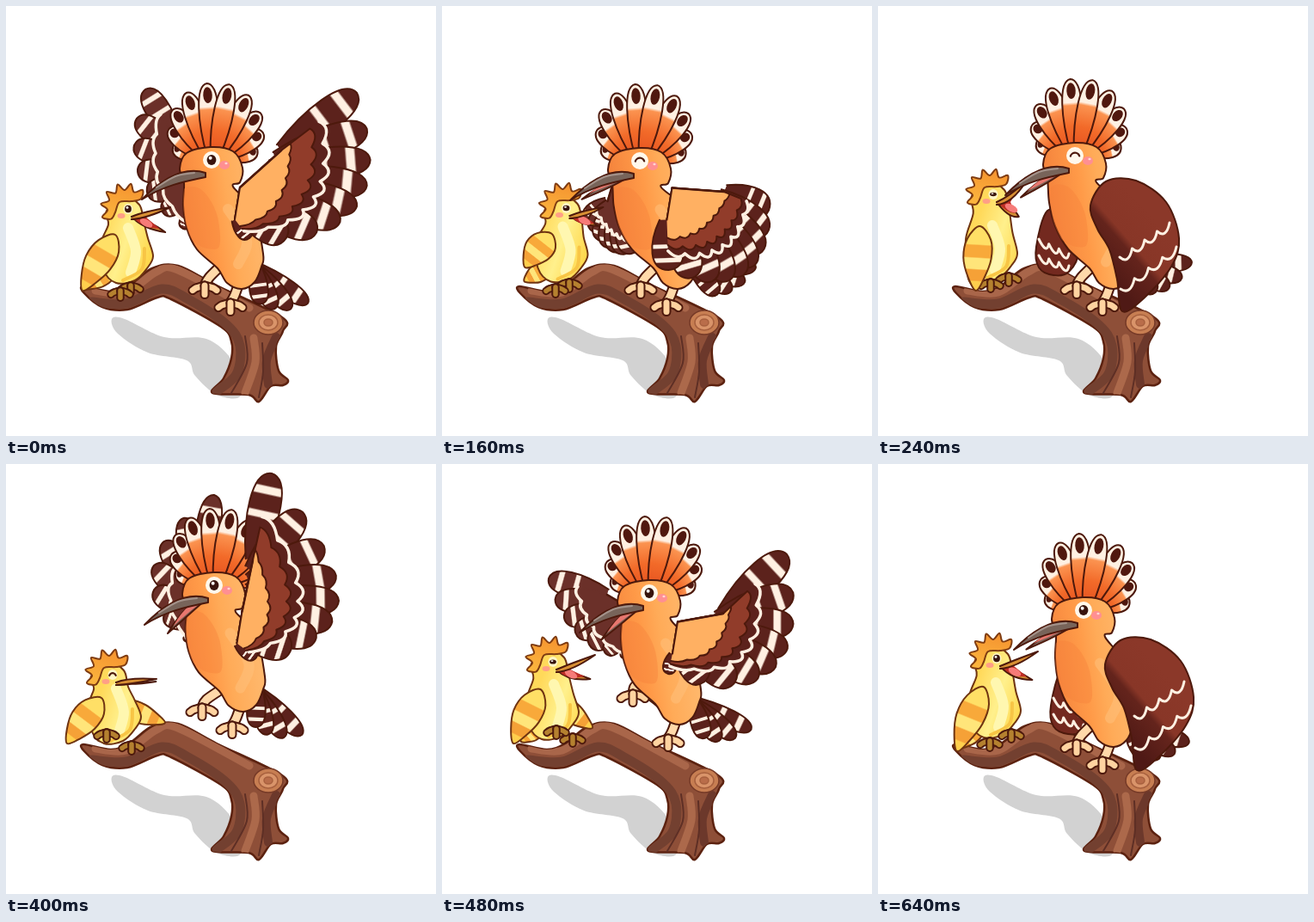
Recreate the animation shown at these times as an HTML page with a canvas. Size 500 px wide and 500 px high, loop 720 ms.

```html
<!DOCTYPE html>
<html>
<head>
<meta charset="utf-8">
<style>
html, body { margin: 0; width: 100%; height: 100%; overflow: hidden; background: #fff; }
canvas { display: block; width: 100vw; height: 100vh; }
</style>
</head>
<body>
<canvas id="stage" width="500" height="500"></canvas>
<script>
const c = document.getElementById('stage').getContext('2d');
const INK = '#4d190c', CREAM = '#fff0e2', GOLD = '#6f3411';
c.lineJoin = c.lineCap = 'round';

// ---- geometry helpers ----
const pairs = a => a.reduce((r, v, i) => (i % 2 ? r[r.length - 1].push(v) : r.push([v]), r), []);
const lerp = (a, b, t) => [a[0] + (b[0] - a[0]) * t, a[1] + (b[1] - a[1]) * t];
const add = (a, b) => [a[0] + b[0], a[1] + b[1]];
const polar = (a, r) => [r * Math.cos(a), r * Math.sin(a)];
const mix = (a, b) => typeof a === 'number' ? (a + b) / 2 : a.map((v, i) => mix(v, b[i]));
// Point on the parabola through three points
const through = ([a, b, d], t) => [0, 1].map(k =>
  a[k] * (1 - t) * (1 - 2 * t) + b[k] * 4 * t * (1 - t) + d[k] * t * (2 * t - 1));

function trace(p, closed = true) {
  const n = p.length, at = i => closed ? p[(i + n) % n] : p[Math.max(0, Math.min(n - 1, i))];
  c.beginPath();
  c.moveTo(...p[0]);
  for (let i = 0; i < n - !closed; i++) {
    const [a, b, d, e] = [at(i - 1), at(i), at(i + 1), at(i + 2)];
    c.bezierCurveTo(b[0] + (d[0] - a[0]) / 6, b[1] + (d[1] - a[1]) / 6,
      d[0] - (e[0] - b[0]) / 6, d[1] - (e[1] - b[1]) / 6, ...d);
  }
}
function paint(fill, stroke = INK, width = 2) {
  if (fill) { c.fillStyle = fill; c.fill(); }
  if (stroke) { c.strokeStyle = stroke; c.lineWidth = width; c.stroke(); }
}
function shape(a, fill, stroke, width) { trace(pairs(a)); paint(fill, stroke, width); }
function line(a, stroke, width) { trace(pairs(a), false); paint(null, stroke, width); }
function tube(a, width, fill) { line(a, INK, width + 4); line(a, fill, width); }
function oval(x, y, rx, ry, fill, stroke = null, turn = 0) {
  c.beginPath();
  c.ellipse(x, y, rx, ry, turn, 0, 7);
  paint(fill, stroke, 1.5);
}
function group([x, y], draw) { c.save(); c.translate(x, y); draw(); c.restore(); }
function inside(draw) { c.save(); c.clip(); draw(); c.restore(); }
function ramp(a, b, stops) {
  const g = c.createLinearGradient(...a, ...b);
  stops.forEach(([t, col]) => g.addColorStop(t, col));
  return g;
}
// Bands of flat colour with a slightly soft seam
const bands = list => list.flatMap(([t, col], i) => [[t, col], [(list[i + 1] || [1.02])[0] - .02, col]]);
const plume = tone => bands([[0, tone], [.5, CREAM], [.58, tone], [.77, CREAM], [.86, tone]]);
const CREST = [[0, '#e4501f'], [.35, '#f26a29'], [.64, '#fb9350'], [.68, CREAM], [1, CREAM]];
const DOWN = bands([[0, '#ffdf66'], [.3, '#f8a93a'], [.5, '#ffe57a'], [.68, '#f5a137'], [.86, '#ffcf4d']]);
// Points tied to a head (weight 1) or a body (weight 0)
const rig = (list, head, body) => list.map(([x, y, w]) => add([x, y], lerp(body, head, w)));

// ---- feathers and wings ----
function feather(b, t, width, stops, spot) {
  const len = Math.hypot(t[0] - b[0], t[1] - b[1]), w = Math.min(width, len * .6);
  group(b, () => {
    c.rotate(Math.atan2(t[1] - b[1], t[0] - b[0]));
    c.beginPath();
    c.moveTo(0, -w * .25);
    c.bezierCurveTo(len * .45, -w * .65, len * .98, -w * .7, len, 0);
    c.bezierCurveTo(len * .98, w * .7, len * .45, w * .65, 0, w * .25);
    paint(ramp([0, 0], [len, 0], stops));
    if (spot) oval(len * .84, 0, len * .11, w * .25, '#50180f');
  });
}

// The tips lie on a parabola from the leading to the innermost feather
function wing(inner, upper, [wrist, ...keys], n, width, tone, coverts) {
  const tip = i => through(keys, i / n), base = i => lerp(wrist, inner, i / n);
  const rim = (from, to) => {
    const at = (i, k = 1) => lerp(base(i), tip(i), (from + (to - from) * i / n) * k);
    c.lineTo(...at(0));
    for (let i = 1; i <= n; i++) c.quadraticCurveTo(...at(i - .5, 1.25), ...at(i));
  };
  const layer = (from, to, fill, edge) => {
    c.beginPath();
    c.moveTo(...inner);
    c.lineTo(...upper);
    c.lineTo(...wrist);
    rim(from, to);
    paint(fill, fill === tone ? tone : INK);
    if (edge) { c.beginPath(); rim(from, to); paint(null, edge, 3.5); }
  };
  for (let i = 0; i <= n; i++) feather(base(i), tip(i), width, plume(tone));
  layer(.5, .62, tone, CREAM);
  coverts.forEach(([from, to, fill]) => layer(from, to, fill));
  c.beginPath();
  c.moveTo(...upper);
  c.lineTo(...wrist);
  paint(null, INK, 2.5);
}

function scallops(a, b, n) {
  c.beginPath();
  c.moveTo(...a);
  for (let i = 1; i <= n; i++) c.quadraticCurveTo(...add(lerp(a, b, (i - .4) / n), [2, 15]), ...lerp(a, b, i / n));
  paint(null, CREAM, 3);
}
function foldedFar() {
  shape([197,238, 184,280, 187,304, 204,313, 222,309, 233,285, 222,245], '#73291f');
  scallops([187, 271], [222, 288], 3);
  scallops([187, 290], [222, 302], 3);
}
function foldedNear() {
  shape([247,232, 265,204, 300,203, 335,228, 350,270, 341,303, 310,339, 284,355, 278,318, 269,283, 255,259],
    ramp([255, 300], [318, 245], [[0, '#4f1915'], [.45, '#64241c'], [.55, '#883627'], [1, '#8b3829']]));
  scallops([281, 292], [339, 252], 4);
  scallops([282, 329], [347, 280], 4);
}

// ---- scenery ----
function scenery() {
  shape([123,364, 138,364, 184,385, 233,387, 264,414, 273,453, 245,452, 220,430, 210,412, 165,403, 130,381], '#d2d2d2', null);
  shape([90,326, 122,332, 143,325, 170,305, 200,302, 245,325, 321,362, 322,378, 314,396, 317,424, 328,435,
    322,441, 308,442, 294,460, 282,452, 240,450, 253,433, 262,410, 262,390, 250,373, 192,341, 176,339,
    141,353, 112,350, 91,334], '#8e4f38', '#5c2210', 2.5);
  inside(() => {
    line([100,344, 140,346, 181,329, 212,341, 256,370, 272,395, 268,428, 245,448], '#734030', 11);
    line([104,331, 140,333, 175,309, 200,307, 283,351], '#a9664a', 9);
    line([288,386, 290,414, 278,450], '#ac694b', 9);
    line([314,385, 303,412, 305,440], '#6c382b', 10);
    line([278,384, 280,415, 262,450], '#5e2f25', 2);
    line([298,392, 299,425, 294,455], '#5e2f25', 2);
  });
  oval(305, 368, 17, 14, '#c77e52', '#763a27');
  oval(305, 368, 11, 9, '#d9946a', '#a7603e');
  oval(305, 368, 5, 4, '#b96d4a', '#a7603e');
}

function eye(r, lid) {
  if (lid > .7) {
    c.beginPath();
    c.arc(0, 2, r * .6, 3.4, 6);
    paint(null, INK, 2.2);
  } else {
    oval(0, 0, r * .6, r * .66 * (1 - lid), '#38140d');
    oval(-r * .15, -r * .25 * (1 - lid), r * .22, r * .22 * (1 - lid), '#fff');
  }
}
function foot([x, y], size, fill) {
  [-1, 1, 0].forEach(k => tube([x, y, x + k * size * .7, y + size * .2, x + k * size, y + size * (.75 - k * k * .35)], size * .5, fill));
}

// ---- parent ----
const TORSO = [[202,189,1], [207,206,1], [206,232,.7], [210,258,.4], [222,283,.1], [246,305,0], [257,322,0],
  [274,329,0], [289,321,0], [297,303,0], [299,288,0], [288,238,.4], [264,210,1], [272,205,1], [275,188,1],
  [264,169,1], [238,164,1], [210,171,1]];

function crest() {
  const n = 9, order = [...Array(n + 1).keys()].sort((a, b) => Math.abs(b - n / 2) - Math.abs(a - n / 2));
  order.forEach(i => {
    const u = i / n, len = 50 + 36 * Math.sin(Math.PI * u);
    feather([-14 + 32 * u, -4], add([4, -4], polar(3.38 + 2.75 * u, len)), 21, CREST, true);
  });
}
function beak(gape) {
  const low = [-72 + 18 * gape, 41 + 15 * gape];
  const jaw = (x, y, bend) => {
    c.beginPath();
    c.moveTo(-9, 16);
    c.quadraticCurveTo(-28, bend, x, y);
    c.quadraticCurveTo(-30, 16, -9, 16);
  };
  if (gape > .1) {
    jaw(...low, 28 + gape * 5);
    paint('#7c6358');
    jaw(low[0] * .88, low[1] * .85, 25 + gape * 4);
    paint('#e8776f', null);
  }
  c.beginPath();
  c.moveTo(-7, 15);
  c.bezierCurveTo(-26, 9, -50, 14, -81, 46);
  c.bezierCurveTo(-56, 30, -32, 25, -7, 20);
  c.closePath();
  paint('#78645a');
  line([-20,15, -42,19, -64,32], '#a4928a', 2);
}
function parent(p, head, mid) {
  for (let i = 0; i < 4; i++)
    feather(add([284 + i * 2, 300], p.hip), add([290, 302], add(p.hip, polar(p.tail + i * .27, 75 - i * 10))), 20, plume('#5c221c'));
  [[[250, 302], [231, 325], p.foot], [[273, 316], [261, 345], p.hip]].forEach(([hip, at, shift]) => {
    const from = add(hip, p.hip), to = add(at, shift);
    tube([...from, ...add(to, [5, -9]), ...to], 9, '#ffd9aa');
    foot(to, 14, '#ffd3a0');
  });

  group(p.eye, crest);
  trace(rig(TORSO, head, p.hip));
  paint(ramp([202, 240], [298, 225], [[0, '#f5843d'], [.38, '#ff9a48'], [.6, '#ffab58'], [1, '#ffb96e']]));
  inside(() => group(mid, () => {
    shape([205,218, 222,211, 237,225, 247,250, 246,282, 215,270], '#f47f3b66', null);
    line([258,236, 280,272, 270,300], '#ffc27d88', 12);
  }));

  if (p.fold) group(p.fold, foldedNear);
  else wing(add([266, 248], mid), add([272, 211], mid), pairs(p.near), 8, 34, '#5c221c',
    [[.38, .5, '#913c2a'], [.12, .36, '#ffb062']]);

  group(p.eye, () => {
    beak(p.gape);
    oval(0, 0, 10, 10, '#fff8ec');
    eye(9, p.lid);
    oval(15, 6, 6, 5, '#ff8f92');
    oval(17, 4, 1.6, 1.2, '#ffd5d2');
  });
}

// ---- chick ----
const CHICK = [[117,238,1], [119,254,.7], [111,275,.1], [113,306,0], [128,322,0], [150,319,0], [164,305,0],
  [171,291,0], [165,270,.3], [160,250,1], [155,231,1], [137,222,1]];

function leaf(root, tip, w) {
  const side = polar(Math.atan2(tip[1] - root[1], tip[0] - root[0]) + Math.PI / 2, w / 2);
  const out = (t, k) => add(lerp(root, tip, t), [side[0] * k, side[1] * k]);
  trace([root, out(.2, .8), out(.5, 1), out(.8, .6), tip, out(.8, -.5), out(.5, -.9), out(.2, -.8)]);
  paint(ramp(root, tip, DOWN), GOLD);
}
function tuft() {
  const spikes = [];
  for (let i = 0; i <= 12; i++) spikes.push(add([-3, -1], polar(2.5 + i * .27, i % 2 ? 29 : 21)));
  trace([...spikes, [4, -9], [-10, -8], [-15, 4]]);
  paint(ramp([0, -28], [-10, 10], [[0, '#f59430'], [1, '#fbb33d']]), '#7f3c12');
}
function bill([x, y], gape) {
  const low = [x - gape * .2, y + gape];
  const part = (tip, bend, fill) => {
    c.beginPath();
    c.moveTo(4, 9);
    c.quadraticCurveTo(18, bend, ...tip);
    c.quadraticCurveTo(22, 11, 4, 12);
    paint(fill);
  };
  part(low, 12 + gape * .4, '#d18a32');
  if (gape > 6) {
    c.beginPath();
    c.moveTo(6, 10);
    c.lineTo(x * .8, y * .8 + 2);
    c.lineTo(20, 9);
    c.lineTo(low[0] * .85, low[1] * .85);
    c.quadraticCurveTo(16, 22, 6, 10);
    paint('#bd2d25', null);
    oval(21, 9 + low[1] * .27, 8, 4, '#f67b78', null, .5);
  }
  part([x, y], 3, '#d89034');
}
function chick(p) {
  const head = add(p.face, [-142, -236]), mid = mix(head, p.body);
  leaf(add([126, 306], p.body), p.rump, 22);
  leaf(add([145, 276], p.body), p.back, 24);
  trace(rig(CHICK, head, p.body));
  paint(ramp([112, 260], [170, 280], [[0, '#ffd95a'], [.5, '#fff08c'], [1, '#ffd84e']]), GOLD);
  inside(() => group(p.body, () => {
    line([142,258, 151,285, 145,310], '#fff7b0', 12);
    line([161,282, 158,306, 136,319], '#f8c545', 4);
  }));
  [p.feet.slice(2), p.feet.slice(0, 2)].forEach(f => foot(f, 11, '#b5812f'));
  leaf(add([127, 266], mid), p.arm, 34);
  group(p.face, () => {
    tuft();
    bill(p.bill, p.chirp);
    oval(0, 0, 5.5, 6, '#fff6c8');
    eye(6.5, p.wink);
    oval(-8, 8, 4.5, 3, '#ff9f86');
  });
}

// ---- key poses; wings: wrist, then leading, middle and innermost tip ----
const HANG = [325,215, 346,298, 312,347, 278,336], HANG_FAR = [197,245, 187,298, 209,312, 229,295];
const base = { lid: 0, gape: 0, hip: [0,0], foot: [0,0], near: HANG, far: HANG_FAR, wink: 0, body: [0,0] };

const spread = { ...base, eye: [239,179], near: [320,168, 408,101, 408,233, 283,270], far: [198,155, 162,97, 153,190, 206,259],
  tail: .62, face: [142,236], bill: [49,-2], chirp: 29, feet: [133,331, 145,325],
  arm: [89,331], back: [163,293], rump: [90,329] };
const half = { ...base, eye: [231,186], lid: .5, near: [331,217, 414,177, 389,279, 249,278], far: [188,209, 146,199, 178,251, 211,281],
  tail: .1, face: [155,251], bill: [48,13], chirp: 3, body: [6,0], feet: [133,333, 144,328],
  arm: [79,277], back: [178,296], rump: [77,311] };
const feeding = { ...base, eye: [229,174], lid: 1, gape: .5, fold: [0,0],
  tail: -.05, face: [134,219], bill: [38,-15], chirp: 41, wink: .5, body: [-9,-3], feet: [131,321, 152,314],
  arm: [114,331], back: [158,292], rump: [114,329] };
const aloft = { ...base, eye: [242,141], gape: 1, hip: [2,-41], foot: [-3,-42],
  near: [287,112, 309,11, 387,159, 291,225], far: [225,130, 242,36, 172,118, 207,205],
  tail: .8, face: [124,245], bill: [51,5], chirp: 3, wink: 1, body: [-14,3], feet: [146,326, 117,312],
  arm: [71,325], back: [185,301], rump: [120,322] };
const landing = { ...base, eye: [241,150], gape: .9, hip: [2,-26], foot: [-9,-58],
  near: [327,174, 401,105, 388,236, 263,244], far: [192,152, 124,133, 155,196, 211,226],
  tail: .45, face: [129,230], bill: [49,-8], chirp: 28, wink: .4, body: [-12,-2], feet: [133,308, 152,317],
  arm: [83,325], back: [175,307], rump: [92,323] };
const rest = { ...base, eye: [239,170], gape: .3, fold: [17,1],
  tail: .3, face: [138,226], bill: [48,-8], chirp: 33, body: [-5,-4], feet: [130,322, 155,312],
  arm: [92,334], back: [160,292], rump: [93,331] };

const between = (a, b) => Object.fromEntries(Object.keys(a).filter(k => k !== 'fold').map(k => [k, mix(a[k], b[k])]));
const poses = [spread, half, between(half, feeding), feeding, between(feeding, aloft), aloft, landing,
  between(landing, rest), rest];

const STEP = 80;
function draw() {
  const p = poses[Math.floor(performance.now() / STEP) % poses.length];
  const head = add(p.eye, [-239, -179]), mid = mix(head, p.hip);
  c.fillStyle = '#fff';
  c.fillRect(0, 0, 500, 500);
  scenery();
  if (p.fold) group(p.fold, foldedFar);
  else wing(add([214, 238], mid), add([208, 190], mid), pairs(p.far), 6, 26, '#6b3029', []);
  chick(p);
  parent(p, head, mid);
  requestAnimationFrame(draw);
}
draw();
</script>
</body>
</html>
```
